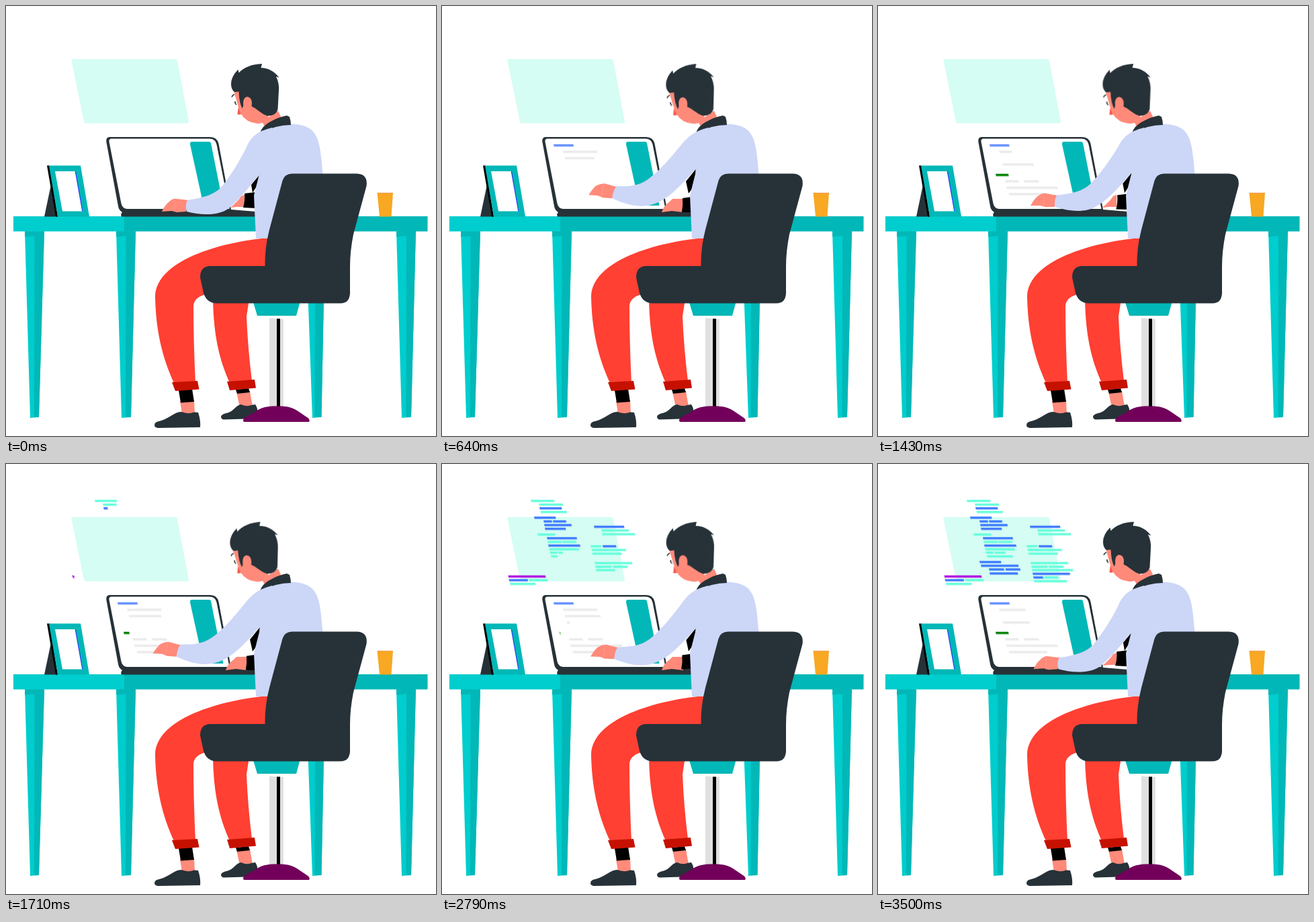
Animation of 640x640 px, one loop 3.57 s. Source, as an HTML page:

```html
<!DOCTYPE html>
<html lang="en">
<head>
<meta charset="utf-8">
<title>Coder at a desk</title>
<style>
html, body { margin: 0; width: 100%; height: 100%; overflow: hidden; background: #fff; }
svg { display: block; width: 100%; height: 100%; }
.dark { fill: #263238; }
.teal { fill: #02b7b7; }
.aqua { fill: #00cdcd; }
.skin { fill: #ff8a7a; }
.red { fill: #ff4033; }
.cuff { fill: #c61100; }
.shirt { fill: #ccd6f7; }

/* three typing strokes per loop */
.pose { animation: 595ms cubic-bezier(.37, 0, .63, 1) infinite alternate; }
#head { transform-origin: 385px 170px; animation-name: nod; }
#arm { animation-name: arm; }
#hand { animation-name: hand; }
#crease { animation-name: crease; fill: none; stroke: #ff9d90; stroke-width: .8; }
#farHand { animation-name: farHand; }
#farCuff { animation-name: farCuff; }
#farSleeve { animation-name: farSleeve; }
@keyframes nod { from { transform: rotate(0deg); } to { transform: rotate(-1.8deg); } }
@keyframes arm {
  from { d: path("M396 181C372 187 364 196 358 210C346 235 334 252 322 268C310 281 295 285 270 289Q266 297 269 306C295 313 320 311 333 300C350 285 364 267 378 250L400 215Z"); }
  to { d: path("M396 181C374 187 368 194 360 202C345 220 325 245 306 258C290 269 275 268 259 268Q254 276 253 286C275 296 290 299 306 297C332 293 352 271 378 242L400 215Z"); }
}
@keyframes hand {
  from { d: path("M232 306Q236 297 242 292Q248 286 254 287L271 289L268 306L254 307L247 305Z"); }
  to { d: path("M218 281Q223 273 228 268Q235 264 242 264L260 269L253 286L239 285L232 282Z"); }
}
@keyframes crease {
  from { d: path("M251 288L251 306"); }
  to { d: path("M240 265L237 284"); }
}
@keyframes farHand {
  from { d: path("M334 300Q345 291 350 283L355 281L355 299L344 299Z"); }
  to { d: path("M327 307Q330 297 339 291L343 287L359 287L359 307L342 305Z"); }
}
@keyframes farCuff {
  from { d: path("M355 279L372 277L372 301L353 300Q356 290 355 279Z"); }
  to { d: path("M358 286L372 284L372 307L357 307Q359 296 358 286Z"); }
}
@keyframes farSleeve {
  from { d: path("M365 266L380 248L377 262Q372 270 367 278Z"); }
  to { d: path("M363 261L380 240L378 257Q375 270 367 279Z"); }
}
</style>
</head>
<body>
<svg id="stage" viewBox="0 0 640 640">
  <path d="M100 79H252Q254.500 79 255 81.500L272 172Q272 174.500 269 174.500H119Q116.500 174.500 116 172L97.500 82Q97 79 100 79Z" fill="#d5fdf3"/>
  <g id="code"></g>

  <!-- desk -->
  <g id="legs"></g>
  <path class="aqua" d="M11 313H176V335.500H11Z"/>
  <path class="teal" d="M176 313H627.500V335.500H176Z"/>

  <!-- picture frame -->
  <path class="dark" d="M67 266L57 313.500H77Z"/>
  <path d="M61 237.500H65L77 313.500H74Z"/>
  <path class="teal" d="M64 237.500H111L124 313.500H77Z"/>
  <path fill="#fff" d="M73 246H103L114 305.500H84Z"/>
  <path d="M103.300 246L113.800 305.500" stroke="#2a35ff" stroke-width="1.200"/>

  <!-- cup -->
  <path d="M552.500 278H576L573.500 313.500H556Z" fill="#f8a823"/>
  <path d="M552.500 278.300H576" stroke="#ef9a6b" stroke-width=".8"/>

  <!-- laptop -->
  <path class="dark" d="M155 195H304Q314 195 316.500 205L335 303L372 306V313.500H172Q170 310 173 307Q168 304 167 298L149.500 203Q148 195 155 195Z"/>
  <path fill="#fff" d="M157 197.500H303Q311.500 197.500 313.500 206L332.500 302H180Q173 301 171.500 294L153.500 202Q153 197.500 157 197.500Z"/>
  <path class="teal" d="M277 202H302Q304.500 202 305 204L323.500 297H294L274 206Q273.500 202 277 202Z"/>
  <g id="screen"></g>

  <!-- far arm -->
  <path id="farHand" class="pose skin"/>
  <path id="farCuff" class="pose"/>
  <path id="farSleeve" class="pose"/>

  <!-- far leg -->
  <path class="skin" d="M343 574L363 573L367 596L348 598Z"/>
  <path d="M342 571L361 569L363 575L344 577Z"/>
  <path class="dark" d="M320 611Q321 607 330 605.500C339 603 342 594 350 593Q358 597 365 594L371 593Q375 599 374 604Q367 611 357 614.500L324 615.500Q320 615 320 611Z"/>
  <path class="red" d="M308 436C309 490 317 525 333 561L366 558Q360 510 358 462L362 436Z"/>
  <path class="cuff" d="M329 559L370 556L372 568.500L333 572Z"/>

  <!-- near leg -->
  <path class="skin" d="M259 588L280 587L281 607H262Z"/>
  <path d="M257 572L277 570L280 589L260 590.500Z"/>
  <path class="dark" d="M221 624Q221 619 228 618C242 615 250 604 261 604Q271 608 280 604.500L286 605Q290 617 289 627L226 628Q221 627 221 624Z"/>
  <path class="red" d="M392 345C335 349 223 374 222 433C223 482 232 522 250 561H282Q279 500 279 446C280 436 289 430 300 429L392 400Z"/>
  <path class="cuff" d="M247 560L285 558L287.500 570.500L252 573Z"/>

  <!-- torso, neck and head -->
  <path class="shirt" d="M382 186C408 173 445 171 458 188C469 202 469 228 472 254L440 346H372L369 282Q372 270 377 250Z"/>
  <path class="skin" d="M381 172L405 156L410 167L386 181Z"/>
  <g id="head" class="pose">
    <path class="skin" d="M339 126H365L392 158L389 171Q382 175 374 175Q357 173 350 161H344.500L346 151Z"/>
    <path d="M346 151L344.500 161.500H349.500Z" fill="#f5584d"/>
    <path class="dark" d="M340 128Q335 124 335 116Q335 105 345.500 94.500L346.500 99.500Q358 87 381 86L379.500 92Q395 92 406.500 106.500L402 105Q407 115 406 126L404.500 154Q402 163.500 389 163.500C380 161 374 153 365 149L354 147L351.500 152.500Q347 143 346.500 127.500Z"/>
    <path class="skin" d="M359 135Q353 136 353 145Q353 154 359 155Q366 154 366 145Q366 136 359 135Z"/>
    <path d="M336 135.500Q337 132.500 340 131.500M341 142Q340.500 145 343 147" fill="none" stroke="#263238" stroke-width="1.600"/>
  </g>
  <path class="dark" d="M378 189Q381 179 392 173Q406 165 418 163L422 165Q424 171 424 177Q402 177 378 189Z"/>

  <!-- near arm -->
  <path id="hand" class="pose skin"/>
  <path id="crease" class="pose"/>
  <path id="arm" class="pose shirt"/>

  <!-- chair -->
  <path class="teal" d="M368 441H437.500L432 461H374Z"/>
  <path fill="#e0e0e0" d="M392 464.500L413 466V598H392Z"/>
  <path d="M403 465.500H408V598H403Z"/>
  <path fill="#72005a" d="M353 617Q353 613 358 611L369 605C380 597 388 595.500 404 595.500C420 595.500 428 598 436 604L450 613.500Q453 617 451 619H355Q353 619 353 617Z"/>
  <path class="dark" d="M411.500 260Q414.500 249.500 426 249.500H522Q539 250 536.500 268L517 340Q512 365 512 388V428Q511 442.500 498 442.500H312Q298 441 294 427L289 404Q289 388 303 387H385.500Q385 360 392 333Z"/>
</svg>

<script>
const LOOP = 3570, GROW = 214;
const NS = "http://www.w3.org/2000/svg";
const MINT = "#66ffdc", BLUE = "#407bff", GREY = "#ebebeb";
const sheet = document.head.appendChild(document.createElement("style"));
const byId = id => document.getElementById(id);
let css = "", count = 0;

function add(parent, tag, attrs) {
  const el = parent.appendChild(document.createElementNS(NS, tag));
  for (const k in attrs) el.setAttribute(k, attrs[k]);
  return el;
}

// A slanted bar whose length follows [time, fraction] stops
function bar(parent, x, y, w, fill, stops) {
  const g = add(parent, "g", { transform: `translate(${x} ${y - 1.8}) skewX(10.7)` });
  const name = "bar" + count++;
  add(g, "rect", { width: w, height: 3.5, fill, style: `animation:${name} ${LOOP}ms linear infinite` });
  const all = [[0, 0], ...stops, [LOOP, stops[stops.length - 1][1]]];
  css += `@keyframes ${name}{` + all.map(([t, v]) =>
    `${(t / LOOP * 100).toFixed(3)}%{transform:scaleX(${v})}`).join("") + "}\n";
}

const rise = (t, d = GROW) => [[t, 0], [t + d, 1]];
const fall = (t, d = GROW) => [[t, 1], [t + d, 0]];

// Rows: y, then x, width, colour for one or two pieces
function column(rows, start) {
  rows.forEach(([y, ...p], i) => {
    const n = p.length / 3;
    for (let k = 0; k < n; k++)
      bar(byId("code"), p[3 * k], y, p[3 * k + 1], p[3 * k + 2],
        rise(start(i) + k * GROW / n, GROW / n));
  });
}

column([
  [55, 132, 35, MINT], [60.5, 144, 36, MINT], [66, 145, 33, BLUE], [71.5, 146.5, 39, MINT],
  [80, 137, 32, BLUE], [85.5, 151, 12.5, BLUE, 165, 19.5, BLUE], [91, 152, 40.5, BLUE],
  [96.5, 153, 31, BLUE], [105, 142, 26, MINT], [110.5, 156, 44.5, BLUE],
  [116, 157, 21, MINT, 179, 20.5, MINT], [121.500, 158, 47.5, BLUE], [127, 159.5, 44, MINT],
  [132, 160.5, 11, MINT, 173, 16.5, MINT], [137.5, 162, 38.5, MINT], [146, 151, 32, BLUE],
  [151.5, 153, 56, BLUE], [157, 165, 22.5, BLUE, 189.5, 22, BLUE], [163, 166, 42, BLUE]
], i => i < 9 ? 1510 + 80 * i : 2262 + 95 * (i - 9));

column([
  [93.5, 226, 45, BLUE], [99, 237, 41, MINT], [104.5, 238, 49, MINT],
  [122.500, 221, 16, MINT, 239, 20, BLUE], [128, 222.5, 51, MINT], [133.5, 223.5, 44, MINT],
  [147.5, 227, 56, MINT], [153, 228, 24, MINT, 254, 22, MINT], [158, 229, 61, MINT],
  [163.500, 230, 55.5, BLUE], [169, 231, 14.5, BLUE, 247, 21, MINT], [174.5, 232, 49, MINT]
], i => i < 5 ? 1787 + 90 * i : 2147 + 136 * (i - 4));

column([
  [167.500, 98.5, 55.5, "#b010e0"], [173, 99.5, 28, BLUE, 129, 28, MINT], [178.5, 101, 38, MINT]
], i => 1700 + 140 * i);

// Lines on the laptop
const line = (x, y, w, fill, ...parts) => bar(byId("screen"), x, y, w, fill, parts.flat());
line(166, 207.5, 29.5, "#6590ff", rise(370), fall(820), rise(1220), fall(1800), rise(2105));
line(180, 217, 51, GREY, rise(420), fall(1000), rise(1350), fall(1990), rise(2400), [[3453, 1], [3569, .45]]);
line(182.5, 226.5, 57.5, GREY, rise(478), fall(1200), rise(1530), fall(2243), rise(2593), fall(3286));
line(185.5, 236, 46, GREY, rise(730), fall(1460), rise(1850), fall(2598), rise(2950), [[3472, 1], [3569, .55]]);
line(175, 251.5, 19, "#008000", rise(790), fall(1592), rise(1950), fall(2587), rise(3000));
line(189, 261, 20, GREY, rise(900));
line(217, 261, 22, GREY, rise(1005));
line(191, 270.5, 76.5, GREY, rise(925));
line(194.5, 280, 57, GREY, rise(1150));
sheet.textContent = css;

// Tapered legs: top left and right, bottom left and right, crease
[[28, 57, 36, 49, 42.5], [164, 193, 172, 186, 178.5], [446, 475, 456, 469.5, 460], [581, 610, 589, 603, 596]]
  .forEach(([a, b, c, d, m]) => {
    const legs = byId("legs");
    add(legs, "path", { class: "aqua", d: `M${a} 335H${b}L${d} 612L${c} 613Z` });
    add(legs, "path", { class: "teal", d: `M${m} 335H${b}L${d} 612H${m - .5}Z` });
    add(legs, "path", { class: "teal", d: `M${a} 335H${b}V341L${a} 343.5Z` });
  });
</script>
</body>
</html>
```
